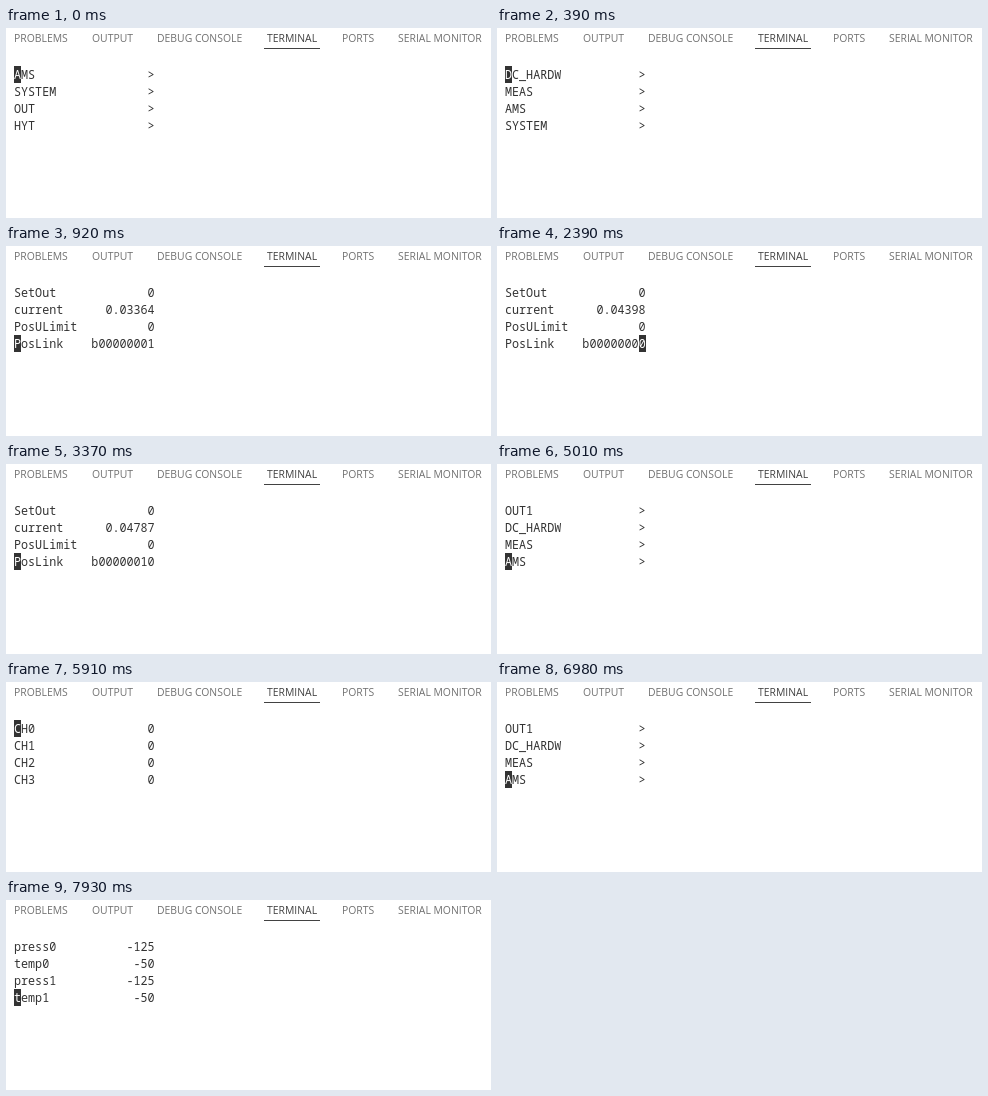
Write an HTML page that moves like this. It is 485 px wide and 190 px high and loops after 8 s.

```html
<!DOCTYPE html>
<html lang="en">
<head>
<meta charset="utf-8">
<title>Terminal menu</title>
<style>
  html, body { margin: 0; width: 100%; height: 100%; overflow: hidden; background: #fff; }
  .tab {
    position: absolute; top: 3px; white-space: pre; color: #717171;
    font: 10.4px/14px "Open Sans", sans-serif;
  }
  .tab.active { color: #424242; }
  #underline { position: absolute; left: 258px; top: 20px; width: 56px; height: 1px; background: #424242; }
  #screen, #cursor {
    position: absolute; left: 8px; top: 38px; margin: 0; white-space: pre; color: #333;
    font: 11.73px/17px "Noto Sans Mono", monospace;
  }
  #cursor { width: 7px; height: 17px; background: #333; color: #fff; }
</style>
</head>
<body>
<div id="tabs"></div>
<div id="underline"></div>
<pre id="screen"></pre>
<div id="cursor"></div>
<script>
const LOOP = 8000, COLS = 20, CELL = 7.04, ROW = 17;

const tabs = [
  ["PROBLEMS", 8], ["OUTPUT", 86], ["DEBUG CONSOLE", 151],
  ["TERMINAL", 261], ["PORTS", 336], ["SERIAL MONITOR", 392],
];
for (const [label, left] of tabs) {
  const tab = document.createElement("span");
  tab.className = label === "TERMINAL" ? "tab active" : "tab";
  tab.textContent = label;
  tab.style.left = left + "px";
  document.getElementById("tabs").append(tab);
}

const line = (name, value) => name + String(value).padStart(COLS - name.length);
const items = ["OUT0", "OUT1", "DC_HARDW", "MEAS", "AMS", "SYSTEM", "OUT", "HYT"];

// Each page returns its four lines plus the cursor cell.
const menu = (first, row) => ({
  lines: items.slice(first, first + 4).map(name => line(name, ">")), row, col: 0,
});
const output = (current, link, col) => ({
  lines: [line("SetOut", 0), line("current", current), line("PosULimit", 0), line("PosLink", "b000000" + link)],
  row: 3, col,
});
const channels = () => ({ lines: [0, 1, 2, 3].map(n => line("CH" + n, 0)), row: 0, col: 0 });
const sensors = row => ({
  lines: [line("press0", -125), line("temp0", -50), line("press1", -125), line("temp1", -50)], row, col: 0,
});

const steps = [
  [0, menu(4, 0)],
  [140, menu(3, 0)],
  [270, menu(2, 0)],
  [410, menu(1, 0)],
  [540, menu(0, 0)],
  [920, output("0.03364", "01", 0)],
  [1200, output("0.03582", "01", 19)],
  [1410, output("0.03795", "01", 19)],
  [1620, output("0.03961", "01", 19)],
  [1830, output("0.04127", "00", 19)],
  [2110, output("0.04236", "00", 19)],
  [2250, output("0.04319", "00", 19)],
  [2390, output("0.04398", "00", 19)],
  [2540, output("0.04461", "00", 18)],
  [2680, output("0.04527", "00", 18)],
  [2810, output("0.04583", "10", 18)],
  [2950, output("0.04652", "10", 18)],
  [3090, output("0.04718", "10", 18)],
  [3370, output("0.04787", "10", 0)],
  [3630, output("0.04821", "10", 0)],
  [3770, menu(0, 0)],
  [4430, menu(0, 1)],
  [4580, menu(0, 2)],
  [4860, menu(0, 3)],
  [5010, menu(1, 3)],
  [5660, menu(1, 2)],
  [5790, channels()],
  [6460, menu(1, 2)],
  [6980, menu(1, 3)],
  [7260, sensors(0)],
  [7640, sensors(1)],
  [7780, sensors(2)],
  [7930, sensors(3)],
];

const screenEl = document.getElementById("screen");
const cursorEl = document.getElementById("cursor");
let shown;

function draw(time) {
  const page = steps.findLast(([start]) => start <= time)[1];
  if (page === shown) return;
  shown = page;
  screenEl.textContent = page.lines.join("\n");
  cursorEl.textContent = page.lines[page.row][page.col];
  cursorEl.style.left = 8 + page.col * CELL + "px";
  cursorEl.style.top = 38 + page.row * ROW + "px";
}

const origin = performance.now();
function tick() {
  draw((performance.now() - origin) % LOOP);
  requestAnimationFrame(tick);
}
tick();
</script>
</body>
</html>
```
